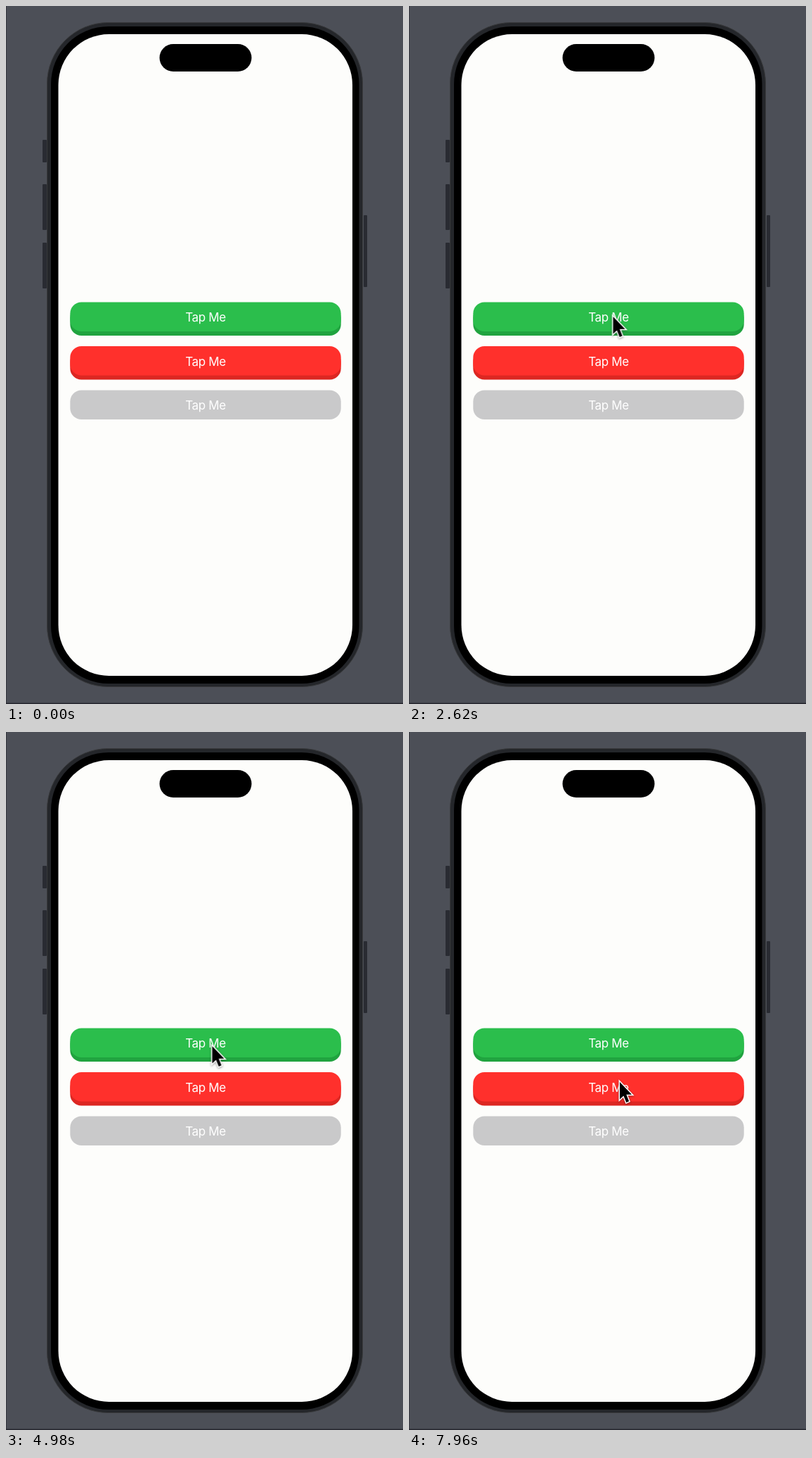
These frames come from a looping animation (565 by 991 pixels, 8 s). An HTML page:

```html
<!DOCTYPE html>
<html lang="en">
<head>
<meta charset="utf-8">
<title>Tap Me buttons</title>
<style>
  html, body { margin: 0; width: 100%; height: 100%; overflow: hidden; background: #4c4f57; }
  svg { display: block; width: 565px; height: 991px; }
  text { font: 17px Inter, Roboto, sans-serif; letter-spacing: -.02em; fill: #fff; text-anchor: middle; }
  #cursor { filter: drop-shadow(0 1.5px 1.5px rgba(0, 0, 0, .4)); }
</style>
</head>
<body>
<svg viewBox="0 0 565 991">
  <rect width="565" height="991" fill="#4c4f57"/>
  <rect width="1" height="991" fill="#34363d"/>
  <rect y="989.5" width="565" height="1.5" fill="#25262e"/>
  <g fill="#292b32">
    <rect x="52" y="190" width="6" height="32" rx="1"/>
    <rect x="52" y="253" width="6" height="65" rx="1"/>
    <rect x="52" y="336" width="6" height="65" rx="1"/>
    <rect x="509" y="297" width="5" height="102" rx="1"/>
  </g>
  <rect x="58.5" y="23.5" width="449" height="943" rx="87" fill="#24262a" stroke="#38393b"/>
  <rect x="64" y="29" width="438.5" height="933" rx="82"/>
  <rect x="74.5" y="40" width="418.5" height="911" rx="72" fill="#fdfdfb"/>
  <rect x="218.5" y="54" width="131" height="39" rx="19.5"/>
  <g id="buttons"></g>
  <path id="cursor" d="M0 0V24.5L5.4 19.5L9.3 29L13.1 27.3L9.3 17.7H17Z"
        stroke="#fff" stroke-width="3" paint-order="stroke"/>
</svg>
<script>
const LOOP = 8000;
const FIRST_TOP = 420.5, PITCH = 62.5, FACE_HEIGHT = 41.5;
const LIP = 6, PRESS_DEPTH = 5;
const PRESS_TIME = 100, HOLD_TIME = 100, RELEASE_TIME = 200;

const buttonLayer = document.getElementById('buttons');
const cursor = document.getElementById('cursor');

function add(parent, tag, attrs = {}, label = '') {
  const node = document.createElementNS('http://www.w3.org/2000/svg', tag);
  for (const key in attrs) node.setAttribute(key, attrs[key]);
  node.textContent = label;
  parent.append(node);
  return node;
}

// Plays moves one after another, holding the position between them
function play(node, start, moves) {
  const key = (time, [x, y], easing) =>
    ({ offset: time / LOOP, transform: `translate(${x}px, ${y}px)`, easing });
  const frames = [key(0, start, 'linear')];
  let position = start;
  for (const { at, lasts, to, easing = 'ease-in-out' } of moves) {
    frames.push(key(at, position, easing), key(at + lasts, to, 'linear'));
    position = to;
  }
  frames.push(key(LOOP, position, 'linear'));
  node.animate(frames, { duration: LOOP, iterations: Infinity });
}

const press = at => [
  { at, lasts: PRESS_TIME, to: [0, PRESS_DEPTH], easing: 'ease-out' },
  { at: at + PRESS_TIME + HOLD_TIME, lasts: RELEASE_TIME, to: [0, 0], easing: 'ease-out' }
];

function addButton({ color, lip, presses = [] }, index) {
  const y = FIRST_TOP + index * PITCH;
  const shape = { x: 91.3, width: 385.4, height: FACE_HEIGHT, rx: 16 };
  if (lip) add(buttonLayer, 'rect', { ...shape, y: y + LIP, fill: lip });
  const face = add(buttonLayer, 'g');
  add(face, 'rect', { ...shape, y, fill: color });
  add(face, 'text', { x: 284, y: y + 27.5 }, 'Tap Me');
  play(face, [0, 0], presses.flatMap(press));
}

[
  { color: '#2bbe4c', lip: '#20a33f', presses: [2000, 3230, 4200] },
  { color: '#ff302c', lip: '#dc2722', presses: [5850, 6720] },
  { color: '#c9c9ca' }
].forEach(addButton);

play(cursor, [590, 330], [
  { at: 500, lasts: 460, to: [425.5, 386], easing: 'ease-out' },
  { at: 960, lasts: 640, to: [290.5, 441] },
  { at: 2620, lasts: 430, to: [290.5, 437] },
  { at: 3580, lasts: 470, to: [293.5, 446] },
  { at: 5050, lasts: 550, to: [300, 497] }
]);
</script>
</body>
</html>
```
